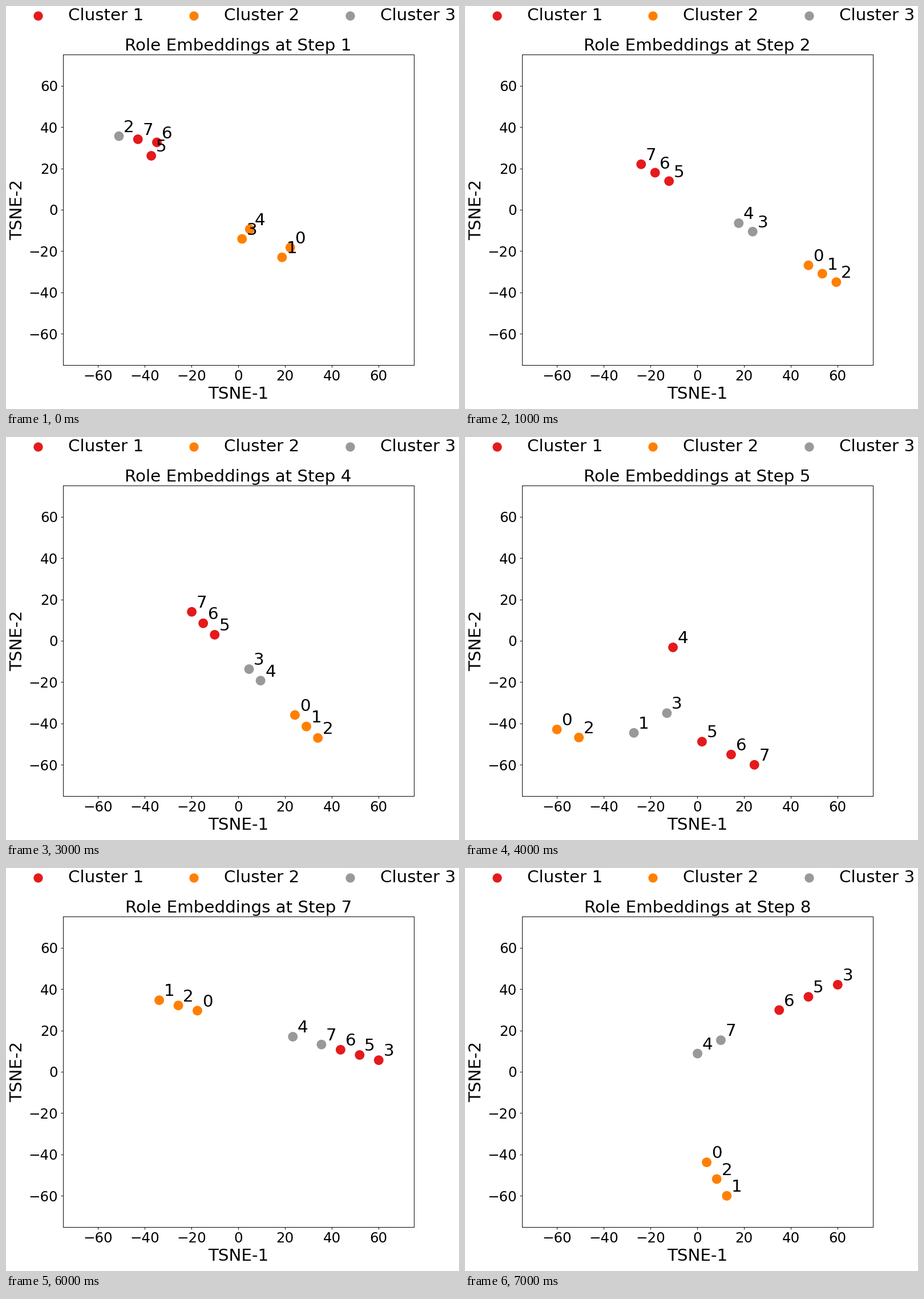
Write a matplotlib script that moves like this. It is 794 by 706 pixels and loops after 8 s.

```python
import numpy as np
import matplotlib.pyplot as plt
from matplotlib.animation import FuncAnimation

W, H = 794, 706
S = 0.882  # overall scale of a 9 x 8 inch layout
BIG, SMALL = 24 * S, 20 * S
DOT_AREA = 150 * S**2
COLORS = {"R": "#e41a1c", "O": "#ff7f00", "G": "#999999"}

# Per step: cluster of roles 0-7, then strands. A strand spaces its roles
# evenly (a dot is an empty slot) on a curve through one to three key points.
STEPS = [
    ("OOGOORRR", {"276": [(-51, 35.6), (-34.8, 32.6)],
                  "5": [(-37.2, 26.1)],
                  "34": [(1.6, -14.1), (4.9, -9.4)],
                  "10": [(18.7, -23), (22.2, -18.3)]}),
    ("OOOGGRRR", {"765....43...012": [(-24, 22), (59.4, -35)]}),
    ("OOOGGGRR", {"765.34": [(-3.9, -9.1), (17.1, -32.2)],
                  "012": [(33.8, -52.5), (39, -50.6), (42, -58.3)]}),
    ("OOOGGRRR", {"765..34..012": [(-19.9, 14), (34, -47)]}),
    ("OGOGRRRR", {"0.2....1..3": [(-60, -42.9), (-36.5, -47.5), (-13, -35)],
                  "4": [(-10.4, -3.2)],
                  "5....6...7": [(2, -48.8), (24.4, -60)]}),
    ("RGRGOOOO", {"4...7..6...5....3...1....2..0":
                  [(-57.4, 3), (1.3, 29.7), (60, 41.1)]}),
    ("OOORGRRG", {"1.2.0.........4..7.6.5.3": [(-33.8, 34.6), (60, 5.6)]}),
    ("OOORGRRG", {"4...7.........6....5....3":
                  [(0.1, 8.8), (30, 27.1), (60, 42.1)],
                  "021": [(4, -43.8), (12.6, -60)]}),
]


def place(strands):
    """Positions of the eight roles on their strands."""
    points = np.zeros((8, 2))
    for slots, keys in strands.items():
        n = len(keys)
        curve = np.polyfit(np.linspace(0, 1, n), keys, n - 1)
        spots = np.vander(np.linspace(0, 1, len(slots)), n) @ curve
        for role, spot in zip(slots, spots):
            if role != ".":
                points[int(role)] = spot
    return points


plt.rcParams.update({
    "font.family": "DejaVu Sans",
    "axes.linewidth": 0.8 * S,
    "axes.titlepad": 6 * S,
    "axes.labelpad": 4 * S,
})

fig = plt.figure(figsize=(W / 100, H / 100), dpi=100, facecolor="white")

# Legend row, laid out in pixels
page = fig.add_axes([0, 0, 1, 1])
page.set(xlim=(0, W), ylim=(H, 0))
page.axis("off")
for i, color in enumerate(COLORS.values()):
    x = 55.7 + 273.45 * i
    page.scatter([x], [17.4], c=color, s=DOT_AREA, linewidths=S)
    page.text(x + 53, 25.3, f"Cluster {i + 1}", fontsize=BIG)

# Embedding plot
left, top, width, height = 99.6, 85.3, 615.2, 543.3
ax = fig.add_axes([left / W, 1 - (top + height) / H, width / W, height / H])
ax.set(xlim=(-75, 75), ylim=(-75, 75))
ax.set_xticks(range(-60, 61, 20))
ax.set_yticks(range(-60, 61, 20))
ax.tick_params(labelsize=SMALL, length=3.5 * S, width=0.8 * S, pad=3.5 * S)
ax.set_xlabel("TSNE-1", fontsize=BIG)
ax.set_ylabel("TSNE-2", fontsize=BIG)
title = ax.set_title("", fontsize=BIG)
dots = ax.scatter([0] * 8, [0] * 8, s=DOT_AREA, linewidths=1.5 * S)
labels = [ax.text(0, 0, str(i), fontsize=BIG) for i in range(8)]


def update(frame):
    groups, strands = STEPS[frame]
    points = place(strands)
    title.set_text(f"Role Embeddings at Step {frame + 1}")
    dots.set_offsets(points)
    dots.set_color([COLORS[g] for g in groups])
    for label, (x, y) in zip(labels, points):
        label.set_position((x + 2, y + 2))
    return [title, dots, *labels]


anim = FuncAnimation(fig, update, frames=len(STEPS), interval=1000, repeat=True)
plt.show()
```
